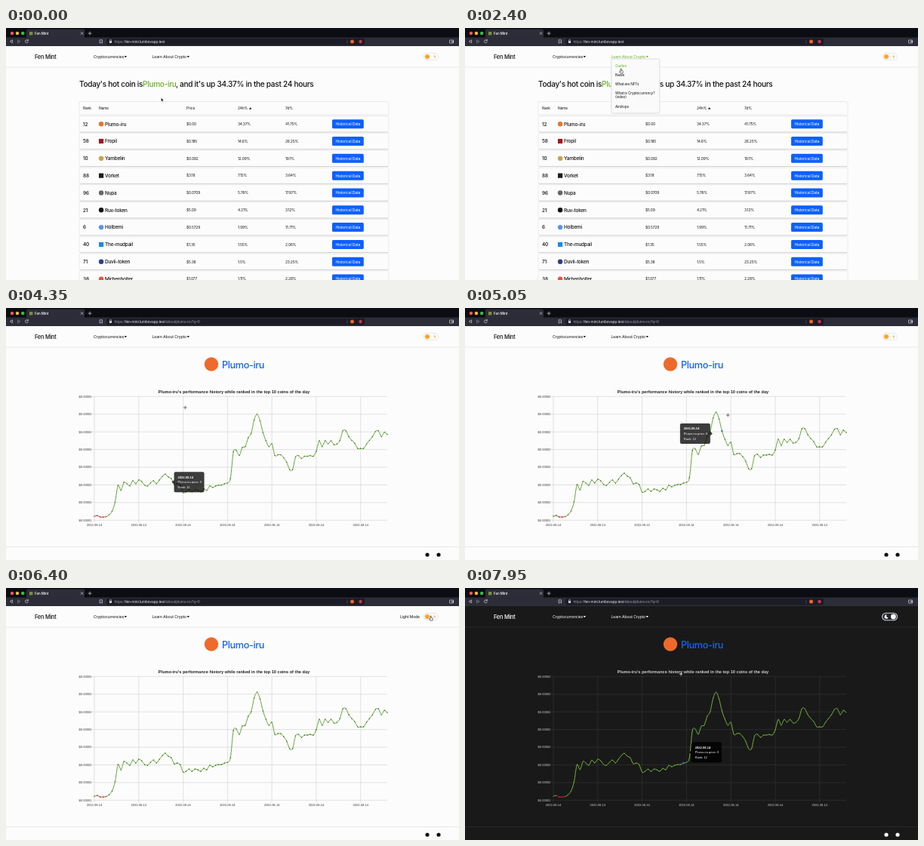
These frames come from a looping animation (600x334 px, 8000 ms). An HTML page:

```html
<!DOCTYPE html>
<html lang="en">
<head>
<meta charset="utf-8">
<title>Fen Mint</title>
<style>
  html, body { margin: 0; width: 100%; height: 100%; overflow: hidden; background: #fcfcfc; }
  svg {
    display: block; width: 100vw; height: 100vh;
    --page: #fcfcfc; --ink: #111; --rule: #dedede; --grid: #cfcfcf; --axis: #333;
    --title: #222; --line: #5fa132; --dots: #3f6f22; --tip: rgba(0,0,0,.76); --cross: #555;
  }
  svg.dark {
    --page: #191919; --ink: #fff; --rule: #303030; --grid: #363636; --axis: #d4d4d4;
    --title: #cfcfcf; --line: #7ab83f; --dots: transparent; --tip: rgba(0,0,0,.86); --cross: #ddd;
  }
  text { fill: var(--ink); font-family: Inter, Roboto, sans-serif; letter-spacing: -.03em; white-space: pre; }
  .plain { font-family: "Liberation Sans", sans-serif; letter-spacing: 0; }
  .mid { font-weight: 500; }
  .bold { font-weight: 700; }
  .green { fill: #6cb02c; }
  .blue { fill: #1463f5; }
  .white { fill: #fff; }
  .grey { fill: #9a9ba6; }
  .pale { fill: #e6e6ec; }
  .axis { fill: var(--axis); }
  .center { text-anchor: middle; }
  .end { text-anchor: end; }
  .icon { fill: none; stroke: #d5d5dc; stroke-width: .7; stroke-linejoin: round; stroke-linecap: round; }
</style>
</head>
<body>
<svg id="stage" viewBox="0 0 600 334" preserveAspectRatio="none"></svg>
<script>
const LOOP = 8000, OPEN_PAGE = 3700, GO_DARK = 6600;
const BRAND = 'Fen Mint', HOST = 'fen-mint.lumbovapp.test', COIN = 'Plumo-iru';
const ROUTE = '/about/plumo-iru?q=0';
const stage = document.getElementById('stage');
const $ = id => document.getElementById(id);

// y is the vertical middle of the line of text
const text = (x, y, s, size = 5.1, cls = '', id = '') =>
  `<text x="${x}" y="${(y + size * .36).toFixed(2)}" font-size="${size}" class="${cls}" id="${id}">${s}</text>`;
const rect = (x, y, w, h, fill, extra = '') =>
  `<rect x="${x}" y="${y}" width="${w}" height="${h}" fill="${fill}" ${extra}/>`;
const dot = (x, y, r, fill, extra = '') => `<circle cx="${x}" cy="${y}" r="${r}" fill="${fill}" ${extra}/>`;
const path = (d, extra = '') => `<path d="${d}" ${extra}/>`;
const group = (id, ...parts) => `<g id="${id}">${parts.join('')}</g>`;
const rule = y => rect(0, y, 600, .7, 'var(--rule)');

const coins = [
  [12, COIN, '$0.00', '34.37%', '41.75%', '#e8762d'],
  [58, 'Fropil', '$0.185', '14.6%', '26.25%', '#a5141f', 1],
  [10, 'Yambelin', '$0.082', '12.09%', '19.1%', '#c9a04a'],
  [88, 'Vorket', '$3.18', '7.15%', '3.64%', '#1d1d1d', 1],
  [96, 'Nupa', '$0.0709', '5.78%', '17.87%', '#666'],
  [21, 'Ruv-token', '$5.09', '4.21%', '3.12%', '#111'],
  [6, 'Holbemi', '$0.5729', '1.99%', '11.71%', '#5b93e6'],
  [40, 'The-mudpail', '$1.35', '1.55%', '2.06%', '#1a8be0', 1],
  [71, 'Duvli-token', '$5.38', '1.5%', '23.25%', '#2a3f8f'],
  [38, 'Mirbenholter', '$1.077', '1.11%', '2.28%', '#f0503c']
];

function browser() {
  return [
    rect(0, 0, 600, 13, '#0c0d12'), rect(0, 12.5, 600, 11.5, '#2c2d38'),
    rect(27, 1.5, 77, 12, '#2c2d38', 'rx="2"'),
    dot(8, 7, 2.2, '#fb5d56'), dot(15, 7, 2.2, '#fbbd2e'), dot(22.2, 7, 2.2, '#2ac840'),
    rect(31, 5, 4.4, 4.4, '#7d8f3a'),
    text(38, 7.2, BRAND, 4.7, 'mid white'),
    path('M99.3 5.8l2.6 2.6m0-2.6l-2.6 2.6M109 7.1h4.2m-2.1-2.1v4.2', 'class="icon"'),
    rect(133, 13.8, 342, 8.8, '#1b1c25', 'rx="2"'),
    path('M8.3 16l-3 1.8 3 1.8zM29 16.5a2 2 0 1 0 .3 2M29.4 15.3v1.5h-1.5M124.5 15.8h3v4.2l-1.5-1.3-1.5 1.3z', 'class="icon"'),
    path('M16 16l3 1.8-3 1.8z', 'class="icon" opacity=".55"'),
    path('M137.5 17.4v-1a1 1 0 0 1 2 0v1', 'class="icon" stroke-width=".5"'),
    rect(136.9, 17.3, 3.2, 2.6, '#d5d5dc'),
    `<text x="143.5" y="19.5" font-size="4.9" class="plain pale"><tspan class="grey">https://</tspan>${HOST}<tspan class="grey" id="route">${ROUTE}</tspan></text>`,
    rect(451.5, 15.5, .6, 5.5, '#555663'), dot(458.5, 18, 2.5, '#f4632a'), dot(469.5, 18, 2.2, '#d8344f'),
    path('M588 16h4.5v4h-4.5zm2.8 1.4h2v1.3h-2z', 'class="icon"')
  ].join('');
}

function nav() {
  const caret = (x, id) => path(`M${x} 37h3.4l-1.7 2.2z`, `id="${id}" fill="var(--ink)"`);
  const sun = Array.from({ length: 8 }, (_, i) =>
    `<path d="M558 34.1v1.2" stroke="#f5a02c" stroke-width=".8" transform="rotate(${i * 45} 558 38)"/>`).join('');
  return [
    rule(51.6),
    text(38, 38, BRAND, 7.4, 'mid'),
    text(116, 38, 'Cryptocurrencies', 5.2), caret(156.6, 'caret1'),
    text(193.5, 38, 'Learn About Crypto', 5.2, '', 'learn'), caret(239.6, 'caret2'),
    text(548, 38, 'Light Mode', 5.2, 'end', 'mode'),
    group('day', rect(553, 33.3, 19.5, 9, '#fff', 'rx="4.5" stroke="#d9dce2" stroke-width=".7"'),
      dot(558, 38, 2.8, '#f5a02c'), sun, path('M568.6 35l-2.6 3.3h1.8l-.9 2.7 2.9-3.6h-1.9z', 'fill="#f3b45a"')),
    group('night', rect(552.6, 33.2, 20, 9.6, '#22242c', 'rx="4.8" stroke="#c9d1e2" stroke-width="1.1"'),
      path('M558.6 35.4a2.7 2.7 0 1 0 2 3.8a2.4 2.4 0 0 1-2-3.8z', 'fill="#fff"'), dot(567.4, 38, 3.4, '#fff'))
  ].join('');
}

function listPage() {
  const box = (y, h) => rect(97, y, 410, h, 'var(--page)', 'rx="1.5" stroke="#dedede" stroke-width=".6"');
  const row = ([rank, name, price, day, week, color, square], i) => {
    const y = 127.2 + i * 22.82;
    return box(y - 10.6, 21.2) + rect(97.8, y + 10.4, 408.4, .7, '#cacaca') +
      text(102, y, rank, 6.5, 'mid') +
      (square ? rect(123, y - 3.1, 6.2, 6.2, color) : dot(126.1, y, 3.2, color)) +
      text(131, y, name, 6.4, 'mid') + text(239, y, price, 4.9) + text(307, y, day, 4.9) + text(370, y, week, 4.9) +
      rect(432, y - 6, 41.8, 12, '#0d60fc', 'rx="1.6"') + text(452.9, y, 'Historical Data', 5.1, 'white center');
  };
  return group('list',
    text(97, 74, "Today's hot coin is", 10.05, 'mid'),
    text(181, 74, COIN, 10.1, 'mid green'),
    text(225, 74, ", and it's up 34.37% in the past 24 hours", 10.1, 'mid'),
    box(97.6, 17.4),
    text(102, 106.5, 'Rank', 4.9), text(123, 106.5, 'Name', 4.9), text(239, 106.5, 'Price', 4.9),
    text(307, 106.5, '24h%', 4.9), path('M321.8 107.6h3.6l-1.8-2.4z'), text(370, 106.5, '7d%', 4.9),
    ...coins.map(row));
}

const menuItems = [[50, 'Guides'], [62, 'News'], [74, 'What are NFTs'], [86, 'What is Cryptocurrency?'], [104, 'Airdrops']];
const menu = () => group('menu',
  rect(193.8, 41, 64, 72, '#fafafa', 'rx="1.5" stroke="#cfcfcf" stroke-width=".7"'),
  ...menuItems.map(([y, s], i) => text(199, y, s, 4.75, '', 'item' + i)),
  text(199, 91.6, '(video)', 4.75));

// chart geometry: 100 daily points, a grid line every 15
const LEFT = 117, STEP = 388 / 99, TOP = 117.3, BASE = 281.3, GAP = (BASE - TOP) / 7;
const prices = [
  276, 275, 277, 277, 276.5, 274, 269, 257, 234, 241, 230, 232, 235, 228, 232, 227, 229, 234, 235, 231,
  228, 232, 227, 222, 219, 223, 225, 233, 232, 234, 244, 243, 240, 243, 240, 241, 243, 239, 241, 235,
  237, 235, 234, 234, 232, 231, 225, 189, 187, 194, 183, 182, 170, 164, 146, 138, 147, 163, 174, 182,
  178, 194, 193, 193, 197, 203, 213, 213, 196, 194, 198, 195, 195, 194, 195, 188, 174, 182, 174, 178,
  174, 179, 178, 173, 160, 160, 168, 173, 177, 184, 184, 184, 178, 173, 168, 161, 160, 168, 162, 165];

function detailPage() {
  let grid = '', labels = '';
  for (let i = 0; i < 7; i++) {
    const x = LEFT + i * 15 * STEP;
    grid += `M${x} ${TOP}V${BASE + 3}`;
    labels += text(x, 287.6, '2022-08-14', 4, 'plain axis center');
  }
  for (let i = 0; i < 8; i++) {
    const y = TOP + i * GAP;
    grid += `M${LEFT - 2.5} ${y}H505`;
    labels += text(113.6, y, i < 7 ? '$0.00002' : '$0.00001', 4.1, 'plain axis end');
  }
  const stroke = (id, color, w) => path('', `id="${id}" fill="none" stroke="${color}" stroke-width="${w}" stroke-linecap="round"`);
  return group('detail',
    dot(272, 74.5, 9.2, '#ee6a2a'),
    text(286, 75, COIN, 12.7, 'mid blue'),
    `<text x="302" y="112.8" font-size="5.6" class="plain bold center" style="fill:var(--title)">${COIN}'s performance history while ranked in the top 10 coins of the day</text>`,
    path(grid, 'fill="none" stroke="var(--grid)" stroke-width=".6"'), labels,
    stroke('up', 'var(--line)', .95), stroke('down', '#e0283c', .95), stroke('marks', 'var(--dots)', 1.4),
    dot(0, 0, 1.2, '#3f6fd0', 'id="active"'),
    group('tip', path('', 'id="bubble" fill="var(--tip)"'),
      text(5, 7, '2022-08-14', 4, 'plain bold white'),
      text(5, 13.7, COIN + ' price: 0', 4, 'plain white'),
      text(5, 20.2, 'Rank: 12', 4, 'plain white')),
    rule(316), dot(558, 327, 2.6, 'var(--ink)'), dot(573, 327, 2.6, 'var(--ink)'));
}

const pointers = () =>
  path('M-1.6-2.6v5l1.2-1.1.8 1.9.9-.4-.8-1.8h1.6z', 'id="arrow" fill="#000" stroke="#fff" stroke-width=".5"') +
  path('M-.9-3q.7-.5 1 .2v2q2.2.2 2.2 1.2l-.4 2.7h-2.7l-1.7-2.2q.2-.8 1.6.2z', 'id="hand" fill="#fff" stroke="#111" stroke-width=".6"') +
  path('M-2.4 0h4.8M0-2.4v4.8', 'id="cross" stroke="var(--cross)" stroke-width=".8"');

stage.innerHTML = rect(0, 0, 600, 334, 'var(--page)') + listPage() + detailPage() + nav() + menu() + browser() +
  group('status', rect(0, 328, 98.5, 6, '#2c2d38'), text(1.5, 331.1, 'https://' + HOST + ROUTE, 3.95, 'plain pale')) +
  group('pointer', pointers());

const route = [
  [0, 207, 95], [500, 207, 93], [1500, 213, 40], [2000, 210, 46], [2400, 207, 57], [2600, 207, 62],
  [3350, 150, 124], [3800, 150, 124], [5050, 348, 142], [5500, 445, 146], [5750, 506, 108], [5950, 556, 60],
  [6150, 563, 40], [6800, 563, 40], [7050, 490, 118], [7150, 440, 136], [7300, 402, 147], [7600, 320, 158],
  [7800, 297, 137], [7950, 286, 114], [8000, 286, 114]];

function pointerAt(t) {
  const i = Math.max(1, route.findIndex(k => k[0] >= t));
  const [t0, x0, y0] = route[i - 1], [t1, x1, y1] = route[i];
  const p = (t - t0) / (t1 - t0);
  return [x0 + (x1 - x0) * p, y0 + (y1 - y0) * p];
}

const show = (id, on) => { $(id).style.display = on ? '' : 'none'; };
const easeOut = p => 1 - (1 - Math.min(1, Math.max(0, p))) ** 4;
const indexAt = x => Math.min(99, Math.max(0, (x - LEFT) / STEP));

function priceHeights(t) {
  return prices.map((y, i) => BASE - (BASE - y) * easeOut((t - (i > 80 ? 3736 : 3718)) / 1000));
}

function drawLine(ys) {
  let up = '', down = '', marks = '';
  const at = i => ys[Math.min(99, Math.max(0, i))], n = v => v.toFixed(2);
  ys.forEach((y, i) => {
    const x = LEFT + i * STEP;
    marks += `M${n(x)} ${n(y)}h0`;
    if (i === 99) return;
    const next = at(i + 1), bend = .16;
    const seg = `M${n(x)} ${n(y)}C${n(x + STEP / 3)} ${n(y + (next - at(i - 1)) * bend)} ` +
      `${n(x + STEP * 2 / 3)} ${n(next - (at(i + 2) - y) * bend)} ${n(x + STEP)} ${n(next)}`;
    if ((y + next) / 2 > 275.5) down += seg; else up += seg;
  });
  $('up').setAttribute('d', up);
  $('down').setAttribute('d', down);
  $('marks').setAttribute('d', marks);
}

// the bubble trails the pointer by averaging its recent targets
function drawTip(t, ys) {
  let ax = 0, ay = 0;
  for (let k = 0; k <= 12; k++) {
    const f = indexAt(pointerAt(t - k * 20)[0]), i = Math.floor(f), j = Math.min(99, i + 1);
    ax += (LEFT + f * STEP) / 13;
    ay += (ys[i] + (ys[j] - ys[i]) * (f - i)) / 13;
  }
  const i = Math.round(indexAt(pointerAt(t - 50)[0]));
  $('active').setAttribute('cx', LEFT + i * STEP);
  $('active').setAttribute('cy', ys[i]);
  const onRight = ax < 311;
  $('tip').setAttribute('transform', `translate(${(onRight ? ax + 4.3 : ax - 44.3).toFixed(2)} ${(ay - 13.5).toFixed(2)})`);
  $('bubble').setAttribute('d', 'M2 0H38q2 0 2 2V25q0 2-2 2H2q-2 0-2-2V2q0-2 2-2z' +
    (onRight ? 'M0 10.7v5.6L-3 13.5z' : 'M40 10.7l3 2.8-3 2.8z'));
}

function draw(t) {
  const [x, y] = pointerAt(t);
  const detail = t >= OPEN_PAGE, dark = t >= GO_DARK, open = t >= 1550 && t < 2780;
  const onSwitch = x > 550 && y < 46;
  const onCanvas = detail && x > 96 && x < 507 && y > 105 && y < 293;
  const onLink = (t >= 1450 && t < 2780) || (t >= 3300 && !detail) || onSwitch;

  stage.setAttribute('class', dark ? 'dark' : '');
  show('list', !detail);
  show('detail', detail);
  show('route', detail);
  show('day', !dark);
  show('night', dark);
  show('mode', onSwitch);
  $('mode').textContent = dark ? 'Dark Mode' : 'Light Mode';
  show('status', t >= 3450 && t < 4000);

  show('menu', open);
  $('learn').setAttribute('class', open ? 'green' : '');
  $('caret2').setAttribute('fill', open ? '#6cb02c' : 'var(--ink)');
  menuItems.forEach(([my], i) => $('item' + i).setAttribute('class', open && Math.abs(y - 4 - my) < 6 ? 'green' : ''));

  if (detail) {
    const ys = priceHeights(t), hovering = onCanvas && t > 3850;
    drawLine(ys);
    show('tip', hovering);
    show('active', hovering);
    if (hovering) drawTip(t, ys);
  }

  $('pointer').setAttribute('transform', `translate(${x.toFixed(2)} ${y.toFixed(2)})`);
  show('cross', onCanvas);
  show('hand', !onCanvas && onLink);
  show('arrow', !onCanvas && !onLink);
}

const start = performance.now();
function tick() {
  draw((performance.now() - start) % LOOP);
  requestAnimationFrame(tick);
}
tick();
</script>
</body>
</html>
```
